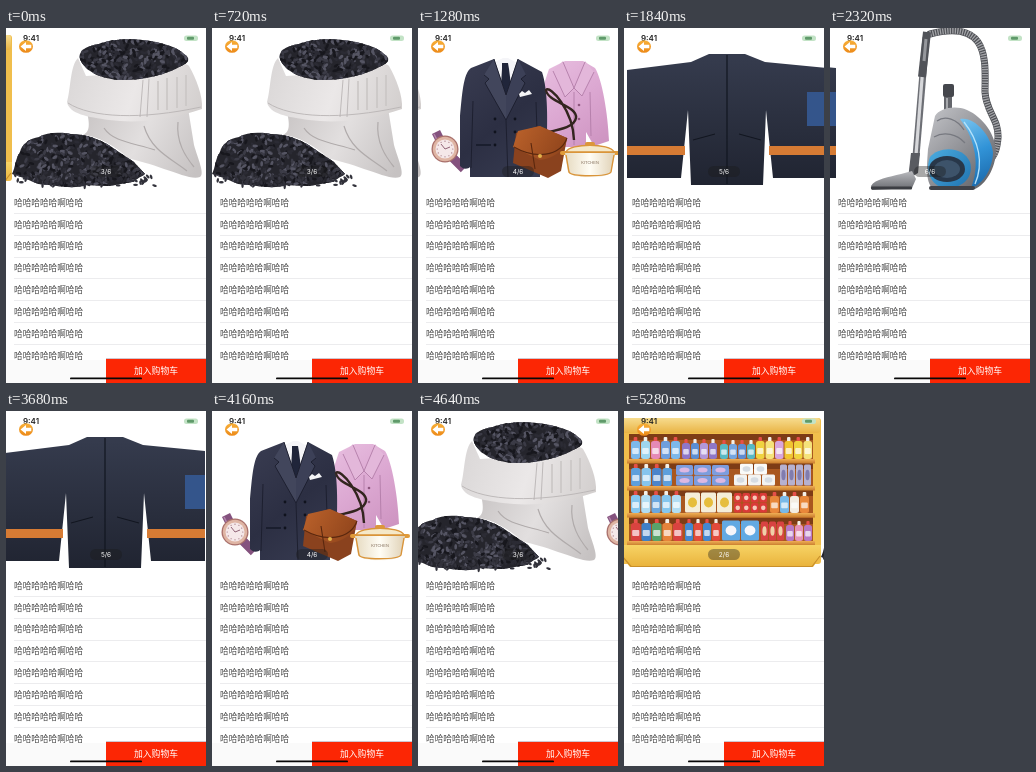
Write an HTML page with a canvas that moves like this. It is 200 px wide and 355 px high and loops after 5.36 s.

```html
<!DOCTYPE html>
<html lang="zh">
<head>
<meta charset="utf-8">
<style>
html, body { margin: 0; width: 100%; height: 100%; overflow: hidden; background: #fff; }
canvas { display: block; width: 200px; height: 355px; }
</style>
</head>
<body>
<canvas id="stage"></canvas>
<script>
const W = 200, H = 355, LOOP = 5360, PAGE_H = 163;
const dpr = Math.max(1, window.devicePixelRatio || 1);

function setup(c, w, h) {
  c.width = w * dpr;
  c.height = h * dpr;
  const g = c.getContext('2d');
  g.scale(dpr, dpr);
  return g;
}

function random(seed) {
  return () => (seed = (seed * 16807) % 2147483647) / 2147483647;
}

// Drawing helpers; shapes are given as SVG path data.
function fill(g, d, color) {
  g.fillStyle = color;
  g.fill(new Path2D(d));
}
function line(g, d, color, w) {
  g.strokeStyle = color;
  g.lineWidth = w;
  g.stroke(new Path2D(d));
}
function rect(g, x, y, w, h, color, r = 0) {
  g.fillStyle = color;
  g.beginPath();
  g.roundRect(x, y, w, h, r);
  g.fill();
}
function oval(g, x, y, rx, ry, color, a = 0) {
  g.fillStyle = color;
  g.beginPath();
  g.ellipse(x, y, rx, ry, a, 0, 7);
  g.fill();
}
function ramp(g, x0, y0, x1, y1, ...colors) {
  const r = g.createLinearGradient(x0, y0, x1, y1);
  colors.forEach((c, i) => r.addColorStop(i / (colors.length - 1), c));
  return r;
}
function label(g, text, x, y, font, color, align = 'center') {
  g.font = font;
  g.fillStyle = color;
  g.textAlign = align;
  g.textBaseline = 'middle';
  g.fillText(text, x, y);
}

function bottles(g, x, end, base, h, w, colors) {
  for (let i = 0; x + w <= end + 0.1; i++, x += w + 1) {
    const c = colors[i % colors.length];
    rect(g, x + w * 0.3, base - h, w * 0.4, 5, i % 2 ? '#f4efe6' : '#e6504a', 1);
    rect(g, x, base - h + 4, w, h - 4, c, 2.5);
    rect(g, x + 1.2, base - h * 0.5, w - 2.4, h * 0.27, '#ffffffb0', 1);
  }
}
function packs(g, x, base, cols, rows, w, h, color, mark) {
  for (let i = 0; i < cols; i++) for (let j = 0; j < rows; j++) {
    const px = x + i * (w + 1), py = base - (j + 1) * (h + 0.5);
    rect(g, px, py, w, h, color, 1.5);
    oval(g, px + w / 2, py + h / 2, w * 0.3, h * 0.25, mark);
  }
}

function shelf(g) {
  rect(g, 0, 7, 200, 146, '#f0be4c', 3);
  rect(g, 1, 7, 198, 15, ramp(g, 0, 7, 0, 22, '#f7dc8e', '#e9b445'), 3);
  rect(g, 8, 23, 184, 110, '#a9571f');
  for (const y of [23, 52, 79, 107]) rect(g, 8, y, 184, 6, '#7d3c16');
  const blues = ['#5d9fdc', '#86c5ee', '#4b84cb'];
  bottles(g, 10, 60, 48, 22, 9, ['#7db8ea', '#9ed6ef', '#e58ab6', '#6f9fdc']);
  bottles(g, 61, 98, 48, 20, 8, ['#8f77c7', '#5b8ed2', '#b298d8']);
  bottles(g, 99, 134, 48, 19, 8, ['#57b9c4', '#74a5df', '#5f8bd0']);
  bottles(g, 135, 191, 48, 22, 8.5, ['#f0d340', '#f5e27a', '#d8a5dc', '#f0c431']);
  bottles(g, 10, 53, 75, 22, 9.5, blues);
  packs(g, 55, 75, 3, 2, 17, 10, '#7d9ddd', '#dcb8e2');
  packs(g, 113, 75, 3, 1, 13, 11, '#f3f3f1', '#d6dce2');
  packs(g, 119, 64, 2, 1, 13, 11, '#fafaf8', '#d6dce2');
  packs(g, 159, 75, 4, 1, 7, 21, '#b6b1cf', '#817cae');
  bottles(g, 10, 61, 102, 22, 9.2, ['#84c6ee', '#b1ddf3', '#6aa7df']);
  packs(g, 64, 102, 3, 1, 15, 20, '#f5eed9', '#e6bd3d');
  packs(g, 113, 102, 4, 2, 7.5, 9.5, '#da3a38', '#f7c9b9');
  bottles(g, 149, 191, 102, 21, 9, ['#e8873a', '#79b9e9', '#f3ede2']);
  bottles(g, 10, 63, 130, 22, 9.5, ['#d94340', '#3e80c7', '#58a36b', '#e5833b']);
  bottles(g, 64, 99, 130, 22, 8, ['#4387d0', '#e24a3c']);
  packs(g, 101, 130, 2, 1, 18, 20, '#62a9e2', '#f6f6fa');
  packs(g, 140, 130, 3, 1, 7, 19, '#d84342', '#f0d0a8');
  bottles(g, 165, 193, 130, 20, 8, ['#b778c4', '#e692b8']);
  for (const y of [48, 75, 102, 130])
    rect(g, 6, y, 188, 4.5, ramp(g, 0, y, 0, y + 5, '#efae55', '#c27527'));
  fill(g, 'M0 134H200V145L192 156H9L0 145Z', ramp(g, 0, 134, 0, 156, '#f7d365', '#e9b23b'));
  line(g, 'M1 145L10 155.5H191L199 145', '#c98f2a', 1.2);
}

function seeds(g, d, count, box, seed) {
  const rnd = random(seed), [x, y, w, h] = box;
  g.save();
  g.clip(new Path2D(d));
  rect(g, x, y, w, h, '#25252c');
  for (let i = 0; i < count; i++)
    oval(g, x + rnd() * w, y + rnd() * h, 2.8, 1.4,
      ['#17171d', '#3b3b46', '#2b2b34', '#555563'][i % 4], rnd() * 3.14);
  g.restore();
}

function sesame(g) {
  fill(g, 'M74 80C79 99 77 104 71 107C86 108 103 118 116 130C126 133 139 136 152 141C168 146 181 152 188 149C193 146 186 131 182 117L176 80Z',
    ramp(g, 72, 80, 186, 140, '#c8c4c4', '#e2dfdf', '#c6c2c2'));
  line(g, 'M92 100C101 114 122 115 143 122M132 98C139 122 158 130 175 143M166 94C164 114 173 128 182 139', '#b0abab', 1.2);
  seeds(g, 'M0 146C4 138 3 131 8 124C9 117 18 110 27 109C35 104 48 104 59 106C77 106 92 113 104 122L122 134L133 146L120 154L98 158L75 157C60 162 42 157 26 156L12 150Z',
    620, [0, 100, 135, 62], 7);
  const rnd = random(31);
  for (let i = 0; i < 60; i++)
    oval(g, 3 + rnd() * 143, 146 + rnd() * 13, 2.4, 1.2, '#32323b', rnd() * 3);
  fill(g, 'M66 30C58 38 59 60 55 74C57 86 76 89 97 92C128 96 160 91 190 81C191 68 184 50 177 38C174 34 164 38 156 43L74 48Z',
    ramp(g, 55, 40, 190, 85, '#dad7d7', '#ebe8e8', '#d2cecd'));
  line(g, 'M56 75C79 90 129 92 189 79M131 52L128 89M137 51L135 89', '#b9b5b5', 0.9);
  line(g, 'M146 53V82M155 50V82M165 49V80M174 47V78', '#cac6c5', 1.6);
  seeds(g, 'M68 31C66 22 75 18 87 16C99 11 120 10 138 13C151 15 165 19 172 26C179 30 177 35 169 38C156 46 133 52 112 52C91 52 73 44 68 31Z',
    560, [62, 7, 118, 50], 19);
}

function watch(g) {
  line(g, 'M5 104L13 120M22 130L33 141', '#84527e', 9);
  line(g, 'M3 106L9 118', '#b285ab', 1.5);
  oval(g, 14, 121, 13.5, 13.5, '#a9706b');
  oval(g, 14, 121, 12.2, 12.2, '#dfb5a4');
  oval(g, 14, 121, 9.5, 9.5, '#f5e8e9');
  for (let i = 0; i < 12; i++)
    oval(g, 14 + 7.8 * Math.cos(i * Math.PI / 6), 121 + 7.8 * Math.sin(i * Math.PI / 6), 0.6, 0.6, '#9b6b78');
  line(g, 'M14 121L10 116M14 121L19 119', '#85556a', 0.9);
}

function suit(g) {
  const pink = ramp(g, 108, 34, 175, 118, '#e8bfe0', '#dca8d2', '#cd93c0');
  fill(g, 'M118 41L134 33H152L164 40C171 51 177 86 178 113L163 118L155 104V119H109L111 62Z', pink);
  fill(g, 'M132 33L143 60L154 33L163 44L151 68L143 60L134 69L122 43Z', '#e3b7da');
  line(g, 'M132 34L143 60L154 34M122 43L134 69L143 60L151 68L163 44M143 64V117M159 64L160 108', '#b37da9', 0.9);
  for (const y of [77, 91]) oval(g, 148, y, 1.3, 1.3, '#8e567f');
  watch(g);
  fill(g, 'M62 35L72 30H77L86 35L90 64H62Z', '#f5f5f8');
  fill(g, 'M71 35H77L78 41L80 57L75 67L70 57L71 41Z', '#20253a');
  fill(g, 'M63 31L40 40C32 45 31 69 29 88V138C33 142 37 141 39 139V149H109V133L115 128C117 93 117 62 111 44L87 31L75 67Z',
    ramp(g, 30, 40, 116, 145, '#383b50', '#2c2f43', '#383c52'));
  fill(g, 'M63 31L53 47L58 51L54 55L75 92V67Z', '#42465c');
  fill(g, 'M87 31L95 47L90 51L94 55L75 92V67Z', '#3c4057');
  line(g, 'M63 31L75 67L87 31M53 47L58 51L54 55L75 92L94 55L90 51L95 47M42 73L40 140M105 74L107 133M75 92L77 149', '#1b1e2d', 0.9);
  line(g, 'M45 117H60M87 117H101', '#151827', 1.3);
  fill(g, 'M88 66L91 63L94 65L98 62L101 66L89 69Z', '#f5f5f7');
  for (const y of [91, 104, 117]) for (const x of [64, 84]) oval(g, x, y, 1.4, 1.4, '#0f121d');
  line(g, 'M100 108C123 102 143 101 145 90C147 78 116 74 115 62C119 57 142 82 143 112', '#33251f', 2.4);
  fill(g, 'M85 105L108 98L136 110L130 143L117 150L82 135Z', '#8a421e');
  fill(g, 'M87 103L109 98L136 110C135 121 124 130 109 132L82 119Z', ramp(g, 85, 103, 133, 131, '#b8602a', '#8e431b'));
  line(g, 'M83 119C104 131 129 129 136 110M100 115L104 141', '#5a270e', 1.1);
  oval(g, 109, 128, 2, 2, '#e2b14b');
  rect(g, 129, 123, 60, 4, '#e09b3a', 2);
  fill(g, 'M134 125H184L180 144C177 151 140 151 137 144Z', ramp(g, 134, 0, 184, 0, '#e6dac0', '#fffdf5', '#dfd0b4'));
  fill(g, 'M135 124C139 115 179 115 183 124Z', '#f5e8c8');
  line(g, 'M134 124H184M135 124C139 115 179 115 183 124M135 127L138 144C140 149 177 149 180 144L183 127', '#d9943a', 1.4);
  rect(g, 154, 114, 10, 4, '#dc963a', 2);
  label(g, 'KITCHEN', 159, 135, '4px "Liberation Sans", sans-serif', '#806c58');
}

function coat(g) {
  fill(g, 'M64 34L82 26H118L138 34L200 40V150H146L139 82L136 157H64L61 82L54 150H0V42Z', ramp(g, 0, 30, 0, 157, '#353b4d', '#202431'));
  rect(g, 0, 118, 58, 9, '#d67b34');
  rect(g, 142, 118, 58, 9, '#d67b34');
  rect(g, 180, 64, 20, 34, '#34558b');
  line(g, 'M100 27V156M66 112L88 106M134 112L112 106', '#121620', 1.2);
}

function vacuum(g) {
  g.lineCap = 'round';
  const hose = 'M94 6C113 1 132 0 142 14C151 27 149 49 149 64C150 84 163 91 162 110C161 124 157 130 149 137';
  line(g, hose, '#4e5055', 7);
  g.lineCap = 'butt';
  g.setLineDash([1.3, 1.2]);
  line(g, hose, '#a2a3a7', 6);
  g.setLineDash([]);
  line(g, 'M90 9L80 128', '#6d6f75', 7);
  line(g, 'M87 38L80 127', '#d6d7da', 3.2);
  line(g, 'M91 4L86 49', '#515359', 8);
  line(g, 'M90 11L88 33', '#95979c', 3);
  fill(g, 'M75 125H84L82 145L72 151Z', '#595b61');
  fill(g, 'M35 158C39 151 53 149 65 146L76 143L80 151L76 160L36 162Z', ramp(g, 0, 145, 0, 162, '#b2b3b7', '#686a6f'));
  rect(g, 35, 158.5, 41, 3, '#3c3e43', 1);
  line(g, 'M112 57V84', '#64666c', 8);
  rect(g, 107, 56, 11, 13, '#45474d', 2);
  line(g, 'M111 70V84', '#a7a9ad', 2);
  fill(g, 'M99 88C104 80 119 77 131 82C147 89 160 107 160 124C159 141 150 156 139 161H97C89 153 91 137 92 121Z',
    ramp(g, 92, 85, 158, 150, '#c0c1c5', '#939499', '#626469'));
  fill(g, 'M124 91C138 88 155 107 157 124C157 140 147 157 135 160C144 139 140 112 124 91Z', ramp(g, 125, 90, 157, 157, '#79c4ef', '#3193d7', '#1965a7'));
  line(g, 'M128 94C143 113 148 135 139 156', '#b4e2fa', 1.3);
  fill(g, 'M94 129C103 118 127 118 134 134C138 148 128 160 111 160C97 160 88 145 94 129Z', ramp(g, 92, 122, 130, 159, '#4bacdf', '#2377b4'));
  oval(g, 111, 141, 18, 13, '#283749');
  oval(g, 111, 141, 13, 9, '#3d536a');
  line(g, 'M101 93C109 87 121 91 128 102M98 109C108 103 121 106 129 115', '#777980', 1.3);
  rect(g, 93, 158, 46, 4, '#404248', 2);
}

const pages = [shelf, sesame, suit, coat, vacuum].map(draw => {
  const c = document.createElement('canvas');
  draw(setup(c, W, PAGE_H));
  return c;
});

// Swipes: start, end, scroll from, scroll to.
const swipes = [
  [-440, 155, 0, 200], [880, 1480, 200, 400], [1480, 1940, 400, 600],
  [1940, 2457, 600, 800], [2680, 2960, 800, 826], [2960, 3380, 826, 800],
  [3380, 3745, 800, 600], [3745, 4087, 600, 400],
  [4087, 4905, 400, 200], [4905, 5389, 200, 0]
];

function ease(u) {
  const s = u * u * (3 - 2 * u);
  return 1 - (1 - s) ** 2;
}
function scrollAt(t) {
  let x = 200;
  for (const [a, b, from, to] of swipes)
    if (t >= a) x = from + (to - from) * ease(Math.min(1, (t - a) / (b - a)));
  return x;
}

const g = setup(document.getElementById('stage'), W, H);
const cjk = '"Noto Sans CJK SC", "Noto Sans CJK", sans-serif';

function list() {
  for (let i = 0; i < 8; i++) {
    const y = 174.4 + i * 21.85;
    label(g, '哈哈哈哈哈啊哈哈', 8, y, '8.65px ' + cjk, '#4a4a4a', 'left');
    rect(g, 8, Math.floor(y + 11), 192, 1, '#ececee');
  }
  rect(g, 0, 332, W, 23, '#fafafa');
  rect(g, 100, 330, 100, 1, '#cfc6d0');
  rect(g, 100, 331, 100, 24, '#fc2604');
  label(g, '加入购物车', 150, 342.8, '8.8px ' + cjk, '#fff');
  rect(g, 64, 349.5, 72, 1.8, '#080808', 0.9);
}

function chrome(x) {
  const page = Math.max(2, Math.min(6, Math.round(x / W) + 2));
  rect(g, 84, 138, 32, 11, 'rgba(25,25,25,.38)', 5.5);
  label(g, page + '/6', 100, 143.6, '6.5px Inter, sans-serif', '#fff');
  label(g, '9:41', 25, 10.2, '600 8px Inter, sans-serif', '#222');
  rect(g, 178, 7.5, 14, 5.5, '#c3e3c6', 2.5);
  rect(g, 181, 8.8, 7, 2.9, '#5f9a6a', 1);
  oval(g, 20, 18.5, 7, 6.3, ramp(g, 0, 12, 0, 25, '#f8b13a', '#ec8918'));
  fill(g, 'M14.5 18.5L20 14V16.7H25.3V20.3H20V23Z', '#fff');
}

function frame(now) {
  const x = scrollAt(now % LOOP);
  rect(g, 0, 0, W, H, '#fff');
  pages.forEach((p, i) => {
    const left = Math.round((i * W - x) * dpr) / dpr;
    if (left > -W && left < W) g.drawImage(p, left, 0, W, PAGE_H);
  });
  list();
  chrome(x);
}

let start;
function tick(now) {
  start ??= now;
  frame(now - start);
  requestAnimationFrame(tick);
}
frame(0);
requestAnimationFrame(tick);
</script>
</body>
</html>
```
